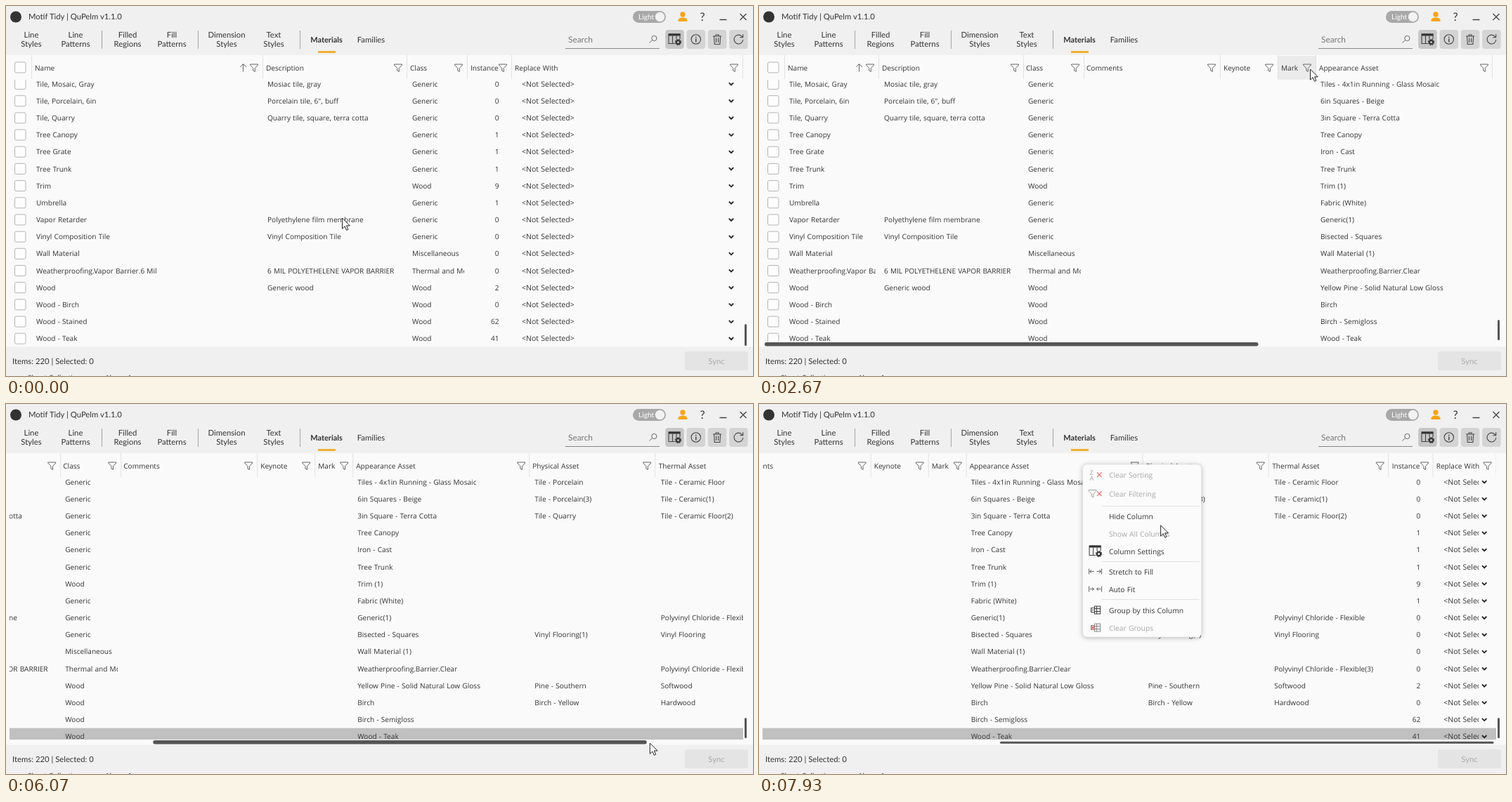
An HTML page that plays this animation: 1063 px wide and 527 px high, repeating every 8000 ms.

```html
<!DOCTYPE html>
<html lang="en">
<head>
<meta charset="utf-8">
<title>Material styles</title>
<style>
  html, body { margin: 0; width: 100%; height: 100%; overflow: hidden; background: #f0f0f0; }
  svg { text-rendering: geometricPrecision; }
  #stage { display: block; width: 100%; height: 100%; }
  text { font: 10.1px "Open Sans", "Noto Sans", sans-serif; word-spacing: .5px; fill: #333; white-space: pre; }
  .ui { font: 11.3px Lato, sans-serif; word-spacing: 0; }
  .choice { font-size: 10.55px; }
  .mid { text-anchor: middle; }
  .end { text-anchor: end; }
  .line { fill: none; stroke: #444; stroke-width: 1.1; }
  .sort { fill: none; stroke: #666; stroke-width: 1; }
  .border { fill: none; stroke: #e2e2e2; }
  .funnel { fill: none; stroke: #666; stroke-width: 1; stroke-linejoin: round; }
  .box { fill: #fdfdfd; stroke: #b4b4b4; stroke-width: 1; }
  .menu text { font-size: 10.3px; }
  .menu .letter { font-size: 9px; }
  .off text { opacity: .42; }
  .off path { opacity: .6; }
  .red { stroke: #d33; stroke-width: 1.5; fill: none; }
  .panel { fill: #fbfbfb; stroke: #ddd; stroke-width: .6; filter: drop-shadow(0 1px 3px #0004); }
</style>
</head>
<body>
<svg id="stage" viewBox="0 0 1063 527" preserveAspectRatio="none"></svg>
<script>
const LOOP = 8000, STEP = 1000 / 15;
const ROW_TOP = 105, FIRST_ROW = 111, ROW_H = 24.18, SCROLL = 497.3;

// name | description | class | instances | appearance | physical | thermal
const rows = `Tile, Mosaic, Gray|Mosiac tile, gray|Generic|0|Tiles - 4x1in Running - Glass Mosaic|Tile - Porcelain|Tile - Ceramic Floor
Tile, Porcelain, 6in|Porcelain tile, 6", buff|Generic|0|6in Squares - Beige|Tile - Porcelain(3)|Tile - Ceramic(1)
Tile, Quarry|Quarry tile, square, terra cotta|Generic|0|3in Square - Terra Cotta|Tile - Quarry|Tile - Ceramic Floor(2)
Tree Canopy||Generic|1|Tree Canopy||
Tree Grate||Generic|1|Iron - Cast||
Tree Trunk||Generic|1|Tree Trunk||
Trim||Wood|9|Trim (1)||
Umbrella||Generic|1|Fabric (White)||
Vapor Retarder|Polyethylene film membrane|Generic|0|Generic(1)||Polyvinyl Chloride - Flexible
Vinyl Composition Tile|Vinyl Composition Tile|Generic|0|Bisected - Squares|Vinyl Flooring(1)|Vinyl Flooring
Wall Material||Miscellaneous|0|Wall Material (1)||
Weatherproofing.Vapor Barrier.6 Mil|6 MIL POLYETHELENE VAPOR BARRIER|Thermal and Moisture|0|Weatherproofing.Barrier.Clear||Polyvinyl Chloride - Flexible(3)
Wood|Generic wood|Wood|2|Yellow Pine - Solid Natural Low Gloss|Pine - Southern|Softwood
Wood - Birch||Wood|0|Birch|Birch - Yellow|Hardwood
Wood - Stained||Wood|62|Birch - Semigloss||
Wood - Teak||Wood|41|Wood - Teak||`.split('\n').map(line => line.split('|'));

const rowY = i => FIRST_ROW + i * ROW_H;
const escape = s => s.replace(/</g, '&lt;').replace(/>/g, '&gt;');
const text = (s, x, y, cls = '', style = '') =>
  `<text x="${x}" y="${y}" class="${cls}" style="${style}">${escape(s)}</text>`;
const path = (d, cls = 'line', style = '') => `<path d="${d}" class="${cls}" style="${style}"/>`;
const rect = (x, y, w, h, fill, r = 0, extra = '') =>
  `<rect x="${x}" y="${y}" width="${w}" height="${h}" rx="${r}" fill="${fill}" ${extra}/>`;
const at = (x, y, body) => `<g transform="translate(${x} ${y})">${body}</g>`;

const funnel = (x, y = 88) => at(x, y, path('M-5.5-5H5.5V-4L1.3 .5V5.5L-1.3 4V.5L-5.5-4Z', 'funnel'));
const checkbox = y => `<rect x="12.5" y="${y - 7.5}" width="15.5" height="15" rx="2" class="box"/>`;
const chevron = (x, y) => path(`M${x - 3.2} ${y - 1.7}l3.2 3.2l3.2-3.2`, 'line', 'stroke:#222;stroke-width:1.8');
const redCross = path('M2.5-3L9 3.5M9-3L2.5 3.5', 'red');
const gearTable = bg => path('M-8.5-7.5H7.5V6H-8.5ZM-3 -5V6M2.5-5V6') + rect(-8.5, -8, 16.5, 3, '#333') +
  `<circle cx="5" cy="4" r="5.2" fill="${bg}"/>
   <circle cx="5" cy="4" r="2.5" fill="none" stroke="#333" stroke-width="2"/>
   <circle cx="5" cy="4" r="3.9" fill="none" stroke="#333" stroke-width="1.5" stroke-dasharray="1.8 1.26"/>`;

function chrome() {
  const tabs = [[36, 'Line', 'Styles'], [99, 'Line', 'Patterns'], [173, 'Filled', 'Regions'],
    [236, 'Fill', 'Patterns'], [314, 'Dimension', 'Styles'], [381, 'Text', 'Styles']];
  const buttons = [
    gearTable('#c6c6c6'),
    '<circle r="6.7" class="line"/>' + path('M0-1V4M0-3.8V-2.3', 'line', 'stroke-width:1.5'),
    path('M-6-4.5H6M-2-4.5V-6.5H2V-4.5M-4.5-4.5L-3.8 7H3.8L4.5-4.5M-1.5-2V4.5M1.5-2V4.5'),
    path('M5.4-3.4A6.4 6.4 0 1 0 6.4 .5M6.3-7.2V-2.8H1.9')
  ];
  return rect(0, 0, 1063, 527, '#f0f0f0') + rect(0, 70, 1063, 415.5, '#fafafa') +
    '<circle cx="14" cy="15.5" r="8" fill="#333"/>' +
    text('Motif Tidy | QuPelm v1.1.0', 32, 19.3, 'ui') +
    rect(892, 7, 47, 17, '#a8a8a8', 8.5) +
    text('Light', 900, 19, 'ui', 'fill:#fff;font-size:10.2px') +
    '<circle cx="930.5" cy="15.5" r="6.7" fill="#f2f2f2"/>' +
    '<g fill="#f5a51d"><circle cx="963" cy="12" r="3.7"/><path d="M956.5 22V20Q957 16.5 963 16.5T969.5 20V22Z"/></g>' +
    text('?', 991, 21, 'ui mid', 'font-size:16px') +
    path('M1015.5 19.5H1025.5M1044.5 11L1053.5 20M1053.5 11L1044.5 20', 'line', 'stroke-width:1.3') +
    tabs.map(([x, a, b]) => text(a, x, 45.3, 'ui mid') + text(b, x, 58, 'ui mid')).join('') +
    path('M136.5 35V61M273.5 35V61M418.5 35V61', 'line', 'stroke:#aaa') +
    text('Materials', 456, 51.7, 'ui mid', 'font-weight:700;font-size:11px') +
    text('Families', 519.5, 51.7, 'ui mid') + rect(444, 64, 25, 3, '#f0b030') +
    text('Search', 800, 52, 'ui', 'fill:#777;font-size:11.9px') +
    path('M796 60.5H930', 'line', 'stroke:#888') +
    path('M915.5 52.5L919.6 48.6M926 46a3.6 3.6 0 1 1-7.2 0a3.6 3.6 0 1 1 7.2 0', 'sort') +
    buttons.map((icon, i) => {
      const x = 951.5 + i * 30.3;
      return rect(x - 13.3, 34, 26.6, 27, i ? '#d4d4d4' : '#c6c6c6', 4) + at(x, 47.5, icon);
    }).join('') +
    text('Items: 220 | Selected: 0', 9, 509.7, 'ui') +
    rect(966, 492, 90, 27, '#e4e4e4', 3) +
    text('Sync', 1011, 509.7, 'ui mid', 'fill:#aaa') +
    text('Sheet Collection', 31, 532.5) + text('Above 1', 141, 532.5);
}

// A column is [title, title x, filter x, right border, cell x, cell width, field].
function table(columns, bottom, chevronX) {
  const cells = ([, , , , x, w, field]) => field === undefined ? '' :
    `<svg x="${x}" y="${ROW_TOP}" width="${w}" height="${bottom - ROW_TOP}">` +
    rows.map((row, i) => {
      const y = rowY(i) + 3.6 - ROW_TOP;
      if (field < 0) return text('<Not Selected>', 0, y, 'choice');
      return field === 3 ? text(row[field], w, y, 'end') : text(row[field], 0, y);
    }).join('') + '</svg>';
  const sortX = columns[0][2] - 15.5;
  return checkbox(87.5) + path('M36.5 70V104', 'border') +
    path(`M${sortX} 93.5V82.5M${sortX - 4.3} 86.8l4.3-4.3l4.3 4.3`, 'sort') +
    columns.map(c => text(c[0], c[1], 91.6) + funnel(c[2]) +
      path(`M${c[3] + .5} 70V104`, 'border') + cells(c)).join('') +
    `<svg y="${ROW_TOP}" width="2000" height="${bottom - ROW_TOP}">` + at(0, -ROW_TOP,
      rows.map((_, i) => checkbox(rowY(i)) + chevron(chevronX, rowY(i))).join('')) + '</svg>';
}

const compact = [
  ['Name', 41, 353, 365, 43, 300, 0], ['Description', 370, 558, 570, 372, 195, 1],
  ['Class', 575, 644, 656, 578, 74, 2], ['Instance', 661, 707, 719, 665, 36.5, 3],
  ['Replace With', 724, 1036, 1048, 734, 280, -1]
];
const expanded = [
  ['Name', 41, 158, 170, 43, 123, 0], ['Description', 175, 364, 376, 178, 195, 1],
  ['Class', 380, 450, 462, 383, 75, 2], ['Comments', 466, 644, 656],
  ['Keynote', 661, 726, 738], ['Mark', 743, 780, 792],
  ['Appearance Asset', 797, 1032, 1043, 799, 240, 4], ['Physical Asset', 1048, 1211, 1222, 1051, 165, 5],
  ['Thermal Asset', 1227.5, 1381, 1392.5, 1230.5, 160, 6], ['Instance', 1398, 1444.5, 1456, 1402, 36.5, 3],
  ['Replace With', 1461, 1534, 1546, 1471.5, 50, -1]
];

function menu() {
  const stretch = 'M-9-4V4M9-4V4M-8 0H-2M8 0H2M-5.5-2.5L-8 0L-5.5 2.5M5.5-2.5L8 0L5.5 2.5';
  const fit = 'M-9-4V4M9-4V4M-8 0H-2M8 0H2M-4.5-2.5L-2 0L-4.5 2.5M4.5-2.5L2 0L4.5 2.5';
  const group = 'M-1-5.5H7V5.5H-1ZM-1-2H7M-1 2H7M2-5.5V5.5M-6-3H-1V3H-6ZM-5 0H-2';
  const letters = text('Z', -8, 0, 'letter') + text('A', -8, 8, 'letter');
  const items = [
    ['Clear Sorting', 101, letters + redCross, 1], ['Clear Filtering', 128, funnel(-4, 0) + redCross, 1],
    ['Hide Column', 160, ''], ['Show All Columns', 185, ''], ['Column Settings', 210, gearTable('#fbfbfb')],
    ['Stretch to Fill', 239, path(stretch, 'sort')], ['Auto Fit', 264, path(fit, 'sort')],
    ['Group by this Column', 294, path(group)],
    ['Clear Groups', 319, path(group) + path('M-6-3L-1 3M-1-3L-6 3', 'red'), 1]
  ];
  return '<rect x="241" y="86" width="169" height="246" rx="6" class="panel"/>' +
    path('M268 145.5H407M268 224.5H407M268 278.5H407', 'border') +
    items.map(([label, y, icon, off], i) =>
      `<g id="item${i}" class="${off ? 'off' : ''}">${at(259, y - .5, icon)}${text(label, 278.3, y + 3.7)}</g>`).join('');
}

const stage = document.getElementById('stage');
stage.innerHTML = chrome() + `
  <rect id="hover" x="5" width="1044" fill="#c0c0c0"/>
  <g id="compact">${table(compact, 485, 1032)}</g>
  <svg x="5" width="1044" height="527" viewBox="5 0 1044 527" id="expanded"><g id="scroller">
    ${rect(738.5, 71, 53.5, 34, '#ebebeb', 0, 'id="mark"')}${table(expanded, 478, 1529.5)}</g></svg>
  <rect id="vbar" x="1051" width="3" rx="1.5" fill="#555"/>
  <rect id="hbar" width="702.5" fill="#555"/>
  <g id="menu" class="menu">${menu()}</g>
  <path id="cursor" d="M0 0V15.2L3.6 11.8L6 17.3L8.4 16.2L6 10.9H10.8Z" fill="#fff" stroke="#222" stroke-width="1"/>`;

const part = Object.fromEntries([...stage.querySelectorAll('[id]')].map(el => [el.id, el]));
const set = (el, attrs) => { for (const key in attrs) el.setAttribute(key, attrs[key]); };
const show = (el, on) => { el.style.display = on ? '' : 'none'; };
const progress = (t, from, to) => Math.min(1, Math.max(0, (t - from) / (to - from)));

// Pointer path: [ms, x, y]
const pointer = [
  [0, 478, 302], [67, 478, 302], [670, 425, 72], [870, 411, 86], [930, 411, 86], [1067, 454, 124],
  [1200, 482, 150], [1400, 325, 186], [1800, 325, 186], [2600, 782, 90], [2666, 784, 90], [4399, 784, 90],
  [4400, 798, 320], [5200, 709, 484], [5333, 704, 484], [5600, 704, 484], [5733, 738, 483], [5866, 738, 483],
  [6200, 1034, 483], [6533, 759, 477], [6667, 735, 474], [7533, 632, 88], [7600, 632, 88], [7933, 556, 194], [8000, 556, 194]
];

function pointerAt(t) {
  const i = Math.max(1, pointer.findIndex(p => p[0] >= t));
  const [t0, x0, y0] = pointer[i - 1], [t1, x1, y1] = pointer[i];
  let p = progress(t, t0, t1);
  if (t1 - t0 > 500) p = p * p * (3 - 2 * p);
  return [x0 + (x1 - x0) * p, y0 + (y1 - y0) * p];
}

// The row highlight trails the pointer by one step and stays on the last row.
function hoveredRow(t) {
  if (t >= 5130) return 15;
  if ((t > 130 && t < 800) || t > 4460) {
    const y = pointerAt(t - STEP)[1];
    return y < ROW_TOP ? -1 : Math.min(15, Math.round((y - FIRST_ROW) / ROW_H));
  }
  return -1;
}

function draw(t) {
  const wide = t >= 1860;
  show(part.compact, !wide);
  show(part.expanded, wide);
  show(part.mark, t > 2660 && t < 4460);
  set(part.vbar, wide ? { y: 447, height: 29 } : { y: 453, height: 31 });

  const scrolled = progress(t, 5866, 6200);
  set(part.scroller, { transform: `translate(${-SCROLL * scrolled} 0)` });
  const thick = t < 4530 || (t >= 5600 && t < 6860);
  show(part.hbar, wide);
  set(part.hbar, { x: 8 + 335 * scrolled, y: thick ? 479 : 480.7, height: thick ? 5.5 : 3, rx: thick ? 2.7 : 1.5 });

  const row = hoveredRow(t), top = rowY(row) - ROW_H / 2;
  show(part.hover, row >= 0);
  if (row >= 0) set(part.hover, { y: top, height: Math.min(ROW_H, 478 - top) });

  const second = t >= 7590;
  show(part.menu, second || (t > 925 && t < 1800));
  set(part.menu, {
    transform: `translate(${second ? 219.6 : 0} 0)`,
    opacity: second ? progress(t, 7530, 7730) : progress(t, 870, 1060)
  });
  set(part.item3, { class: second ? 'off' : '' });

  const [x, y] = pointerAt(t);
  set(part.cursor, { transform: `translate(${x + .5} ${y})` });
}

function tick() {
  const t = performance.now() % LOOP;
  draw(Math.floor(t / STEP + 1e-6) * STEP);
  requestAnimationFrame(tick);
}
tick();
</script>
</body>
</html>
```
